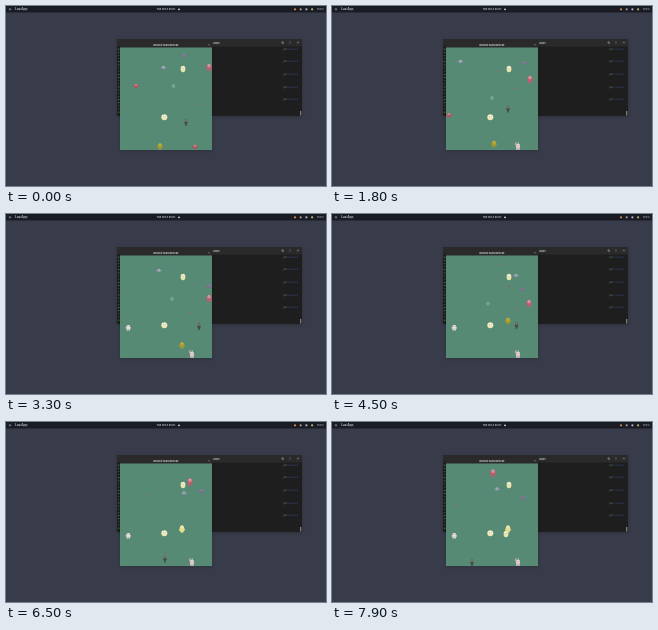
Write an HTML page that moves like this. It is 320 by 180 pixels and loops after 8000 ms.

```html
<!DOCTYPE html>
<html lang="en">
<head>
<meta charset="utf-8">
<title>Desktop game</title>
<style>
  html, body { margin: 0; width: 100%; height: 100%; overflow: hidden; background: #383c4a; }
  svg { display: block; width: 100vw; height: 100vh; }
  text { font-family: Inter, Roboto, sans-serif; fill: #d2d4d8; }
  .mono { font-family: "DejaVu Sans Mono", monospace; }
</style>
</head>
<body>
<svg viewBox="0 0 320 180">
  <defs>
    <filter id="soft" x="-20%" y="-20%" width="140%" height="140%"><feGaussianBlur stdDeviation="1.5"/></filter>
    <clipPath id="field"><rect x="114" y="41.5" width="92" height="102.5"/></clipPath>
  </defs>
  <rect width="320" height="180" fill="#383c4a"/>

  <rect width="320" height="6.5" fill="#1a1c25"/>
  <circle cx="4" cy="3.3" r="1.2" fill="#59647a"/>
  <text x="9" y="4.3" font-size="3.1" font-weight="600">Lua App</text>
  <text x="160" y="4.2" font-size="2.45" font-weight="600" text-anchor="middle">Tue Oct 3  20:01</text>
  <circle cx="173" cy="3.3" r=".9" fill="#dcdcdc"/>
  <g id="tray"></g>
  <text x="311" y="4.3" font-size="2.7">100%</text>

  <rect x="111" y="34" width="185" height="77" fill="#111" opacity=".2" filter="url(#soft)"/>
  <rect x="111" y="33" width="185" height="77" rx="1" fill="#1e1e1e"/>
  <path d="M111 40.5V34q0-1 1-1h183q1 0 1 1v6.5z" fill="#2a2a2a"/>
  <text x="205" y="37.5" font-size="2.5" font-weight="600">~/code</text>
  <g fill="none" stroke="#b8b8b8" stroke-width=".5">
    <circle cx="276.6" cy="36.5" r=".8"/><path d="M277.2 37.1l.8.8"/>
    <path d="M284 35.4v2.6" stroke-dasharray=".6 .4"/>
    <path d="M291.2 35.8l1.5 1.5m0-1.5l-1.5 1.5"/>
  </g>
  <g id="shell"></g>
  <rect x="294.3" y="105" width=".9" height="4.5" fill="#aaa"/>

  <rect x="114" y="37" width="92" height="108" fill="#111" opacity=".2" filter="url(#soft)"/>
  <path d="M114 42v-5q0-1 1-1h90q1 0 1 1v5z" fill="#2a2a2a"/>
  <rect x="114" y="41.5" width="92" height="102.5" fill="#578a74"/>
  <text x="160" y="39.8" font-size="2.35" font-weight="700" text-anchor="middle">Bouncy Island Rescue</text>
  <path d="M202.4 38.2l1.2 1.2m0-1.2l-1.2 1.2" stroke="#bbb" stroke-width=".4"/>
  <g id="actors" clip-path="url(#field)"></g>
</svg>
<script>
const NS = 'http://www.w3.org/2000/svg';
const LOOP = 8000, STEP = 100;
const byId = id => document.getElementById(id);

function add(parent, tag, attrs, text) {
  const el = document.createElementNS(NS, tag);
  for (const k in attrs) el.setAttribute(k, attrs[k]);
  if (text) el.textContent = text;
  parent.append(el);
  return el;
}

['#dc883f', '#b59a8c', '#b4b7bf', '#c0ad76'].forEach((fill, i) =>
  add(byId('tray'), 'circle', { cx: 289 + i * 5.7, cy: 3.3, r: 1.1, fill }));

const shell = byId('shell');
for (let i = 0; i < 5; i++) {
  const line = add(shell, 'text', { x: 277, y: 43.8 + i * 12.6, 'font-size': 2.6, class: 'mono' });
  add(line, 'tspan', { style: 'fill:#71808d' }, 'git:');
  add(line, 'tspan', { style: 'fill:#3f4f8c' }, '(main)');
}
const inks = ['#648f42', '#437c8a', '#4d4d4d', '#4d4d4d'];
for (let i = 0; i < 21; i++) {
  add(shell, 'rect', { x: 111.9, y: 42.7 + i * 3.15, width: 1.4, height: .9, fill: inks[i % 4] });
}

// Body size and colour, face colour, and optional ears, wings or feet.
const looks = {
  egg: { w: 4.8, h: 6.6, body: '#e8e4aa', face: '#f7f5dc' },
  orb: { w: 6, h: 6, body: '#ece8b2', face: '#f7f5dc' },
  gold: { w: 4, h: 7, body: '#a89b2b', face: '#cdbb42', wings: 6, feet: true },
  glow: { w: 4.6, h: 7.4, body: '#e5dc88', face: '#f7f3cf', wings: 6 },
  pink: { w: 4.2, h: 8, body: '#c45a70', face: '#e6a5aa', wings: 5.4, feet: true },
  red: { w: 4, h: 5, body: '#b84f60', face: '#dd9299', wings: 5.6, feet: true },
  white: { w: 4.2, h: 6, body: '#ded5cf', face: '#f0e8e2', wings: 5.4, feet: true },
  bunny: { w: 4.2, h: 7, body: '#dfc0bd', face: '#f0e3de', ears: true, feet: true },
  bat: { w: 3.4, h: 3.4, body: '#9a98b3', face: '#d2cbd6', wings: 6 },
  imp: { w: 3.2, h: 3.6, body: '#82699b', face: '#aa8fba', wings: 5 },
  leaf: { w: 3.6, h: 4.2, body: '#70a994', face: '#7db8a2' },
  hero: { w: 2.4, h: 7.6, body: '#414a40', face: '#96745f', wings: 3.4, feet: true },
  shot: { w: 1.7, h: 1.1, body: '#a85353' }
};

function sprite(name) {
  const { w, h, body, face, wings, ears, feet } = looks[name];
  const el = add(byId('actors'), 'g', {});
  const box = (x, y, width, height, fill) =>
    add(el, 'rect', { x: x - width / 2, y: y - height / 2, width, height, fill });
  if (wings) box(0, h * .08, wings, h * .2, body);
  for (const side of [-1, 1]) {
    if (ears) box(side * w * .28 - 1, -h * .4, 1, h * .4, body);
    if (feet) box(side * w * .25, h * .4, w * .3, h * .25, body);
  }
  add(el, 'ellipse', { rx: w / 2, ry: h * (feet ? .4 : .5), fill: body });
  if (!face) return el;
  add(el, 'ellipse', { cy: -h * .17, rx: w * .36, ry: h * .2, fill: face });
  for (const side of [-1, 1]) box(side * w * .17, -h * .13, .5, .6, '#55534e');
  return el;
}

const actors = [];
const lerp = (a, b, p) => a + (b - a) * p;

function cast(name, path, start = 0, end = LOOP) {
  actors.push({ el: sprite(name), path, start, end });
}

const still = (x, y) => () => [x, y];

// Straight walks between the places reached at the shared turning times.
const TURNS = [0, 1800, 3300, 4500, 5400, 6500, 7900];
function walk(...spots) {
  return t => {
    let i = 0;
    while (i < spots.length - 2 && t >= TURNS[i + 1]) i++;
    const p = Math.min(1, (t - TURNS[i]) / (TURNS[i + 1] - TURNS[i]));
    return spots[i].map((v, k) => lerp(v, spots[i + 1][k], p));
  };
}

let seed = 23;
const random = () => (seed = seed * 16807 % 2147483647) / 2147483647;

const heroPath = walk([180, 116], [176, 102.5], [193, 112], [184.5, 111],
  [181, 109], [159, 136.5], [140, 140]);

// The hero fires evenly through the loop, mostly up and to the left.
const SHOTS = 14, FLIGHT = 1700;
for (let i = 0; i < SHOTS; i++) {
  const start = Math.floor(i * LOOP / SHOTS / STEP) * STEP - STEP * 10;
  const [x, y] = heroPath(Math.max(0, start));
  const angle = -Math.PI * (.3 + random() * .5);
  const reach = t => (t - start) * .042;
  cast('shot', t => [x + Math.cos(angle) * reach(t), y + Math.sin(angle) * reach(t)],
    start, start + FLIGHT);
}

const HEAL = 2400, SHINE = 4900, ARRIVE = 1100;
const patient = walk([130, 79.5], [117, 109], [125, 116]);
cast('red', patient, 0, HEAL);
cast('white', still(122.3, 113.5), HEAL);
cast('red', still(189, 140.5), 0, ARRIVE);
cast('bunny', still(186, 140.5), ARRIVE);
cast('egg', still(177, 63));
cast('orb', still(158.3, 111.3));
cast('leaf', walk([167.5, 80], [160, 92], [166, 85], [156, 89.5]), 0, SHINE);
cast('gold', walk([154, 140], [162, 137.5], [176, 131], [176, 106.5]), 0, SHINE);
cast('glow', still(176, 107), SHINE);
cast('egg', still(174, 112), 7200);
cast('bat', walk([157.5, 61.5], [128.5, 55.5], [153, 56.5], [184, 61.5],
  [184, 48.5], [178, 71], [165, 67]));
cast('imp', walk([178, 49.5], [192.5, 57], [203, 72], [190, 75],
  [202, 73], [195.5, 69], [191, 76]));
cast('pink', walk([203, 61], [198, 73], [203, 84], [197, 89], [193, 86], [184, 59.5], [161, 50.5]));
cast('hero', heroPath);

function draw(now) {
  const t = Math.floor((now % LOOP) / STEP) * STEP;
  for (const { el, path, start, end } of actors) {
    const live = t >= start && t < end;
    el.style.display = live ? '' : 'none';
    if (live) el.setAttribute('transform', `translate(${path(t)})`);
  }
}

const begin = performance.now();
function tick() {
  draw(performance.now() - begin);
  requestAnimationFrame(tick);
}
tick();
</script>
</body>
</html>
```
